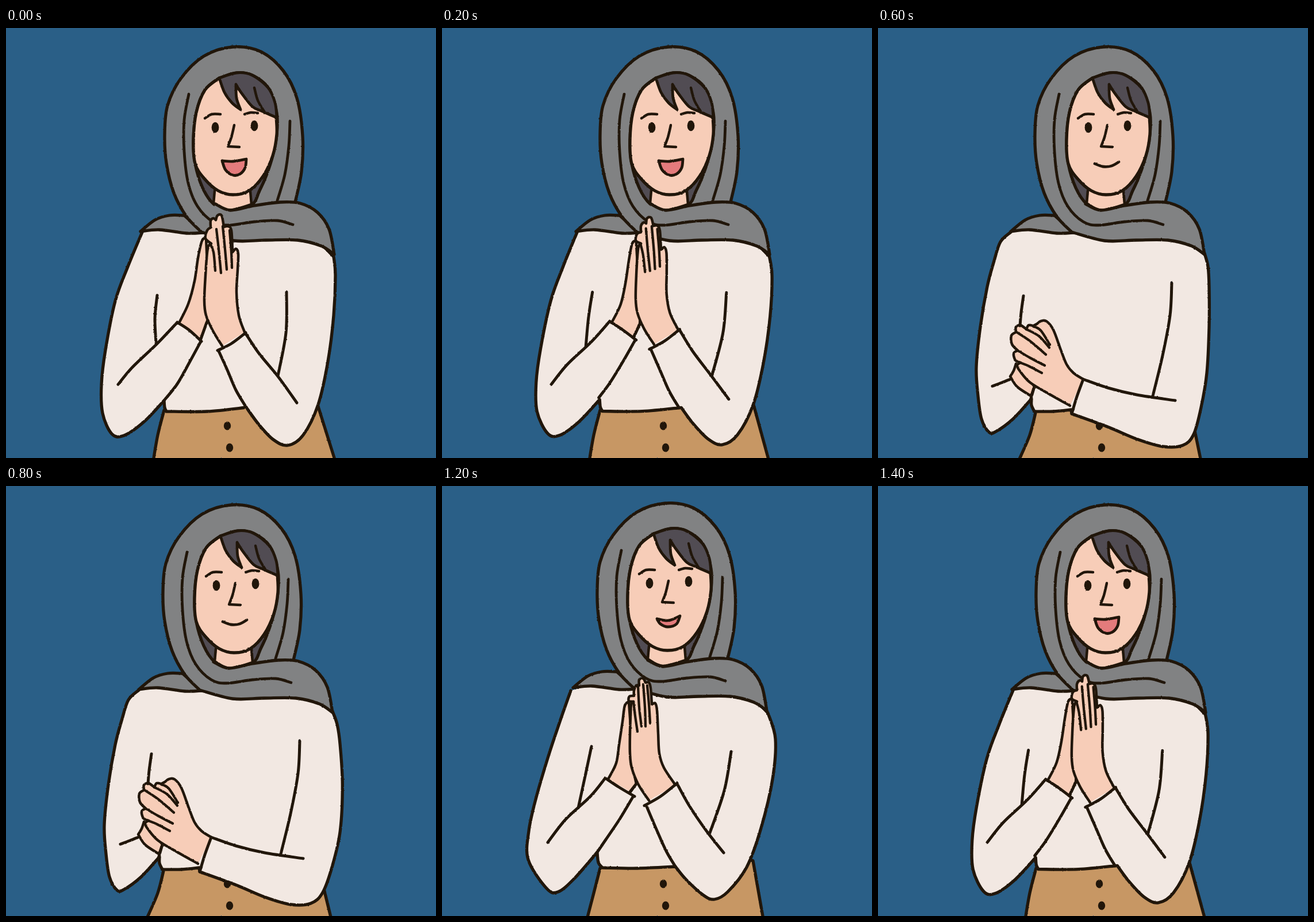
Animation, 748 px wide and 748 px high, one loop 1.6 s. Source, as an HTML page:

```html
<!DOCTYPE html>
<html lang="en">
<head>
<meta charset="utf-8">
<title>Greeting</title>
<style>
html, body { margin: 0; width: 100%; height: 100%; overflow: hidden; background: #2a5f87; }
svg { display: block; width: 100%; height: 100%; }
path { stroke: #21160a; stroke-linecap: round; stroke-linejoin: round; }
</style>
</head>
<body>
<svg id="stage" viewBox="0 0 748 748">
  <filter id="pencil" filterUnits="userSpaceOnUse" x="0" y="0" width="748" height="748" color-interpolation-filters="sRGB">
    <feTurbulence type="fractalNoise" baseFrequency=".25" numOctaves="2" seed="4"/>
    <feDisplacementMap in="SourceGraphic" scale="2" xChannelSelector="R" yChannelSelector="G"/>
  </filter>
</svg>
<script>
const SCARF = '#818283', SKIN = '#f7cdb8', SHIRT = '#f2e8e2', SKIRT = '#c79764',
  HAIR = '#514c53', LIP = '#e47b7c', INK = '#21160a', NONE = 'none';

// Smooth curves through key points: "/" marks a corner, ";" starts a new line.
const scarf = {
  drapeL: '232,354 257,334 282,326 308,326 / 342,356 / 312,357 265,351 232,354',
  hood: '338,355 312,328 290,287 277,235 274,185 279,135 302,88 342,49 392,33 441,41 480,74 504,122 514,188 512,250 501,303',
  drapeR: '362,306 388,317 430,309 475,303 510,305 540,321 560,350 569,394 / 546,379 505,369 450,369 395,370 338,355',
  folds: '316,115 308,160 308,215 315,270 331,310 358,337 385,343 430,337 470,335 497,342; 492,162 490,205 483,255 470,300'
};
const face = {
  opening: '372,87 347,108 332,147 327,195 330,236 343,278 362,306 388,317 428,308 442,283 454,256 465,222 472,185 472,148 458,105 429,82 402,78 372,87',
  neck: '364,283 / 362,305 / 388,317 428,307 / 426,284',
  skin: '372,87 347,108 332,147 327,195 330,236 346,262 370,283 396,290 424,283 448,258 465,222 472,185 471,154',
  fringe: '372,87 381,112 394,130 409,142 / 402,122 401,98 / 412,115 430,137 447,145 472,156 / 469,130 457,104 429,82 402,78 372,87',
  strand: '433,104 439,126 450,145',
  brows: '347,157 359,150 374,150; 416,150 427,147 439,148',
  nose: '398,169 393,190 387,206 / 407,207'
};
const mouths = {
  open: '377,231 / 396,232 419,228 / 417,243 408,254 396,256 383,247 377,231',
  half: '378,235 / 398,238 418,230 / 412,244 397,249 384,244 378,235',
  smile: '376,236 390,241 405,240 418,233'
};

// Two ends of the raised-hands gesture, point for point alike.
const upright = {
  body: '237,355 212,415 190,475 173,560 166,620 168,670 184,706 205,709 240,685 275,648 / 276,660 279,667 / 350,667 418,660 / 440,690 465,716 490,726 517,708 543,655 560,580 570,500 573,430 570,398',
  back: '301,513 / 317,480 328,440 334,400 341,370 348,365 / 354,500 / 349,512 / 338,544',
  front: '376,553 / 360,527 348,500 345,475 347,430 350,390 353,378 357,375 / 347,366 350,352 356,347 / 356,335 361,331 365,334 / 368,326 375,326 379,346 / 386,345 392,352 394,390 / 400,384 404,393 403,420 401,460 405,500 415,529',
  fingers: '355,375 361,390 364,422; 366,350 370,385 374,426; 377,345 381,385 384,420; 389,352 392,390 393,417',
  arms: '298,512 318,525 340,545; 339,545 320,580 298,619 275,648; 298,512 262,550 220,590 195,620; 263,465 259,505 261,548; 349,513 338,543; 368,561 392,549 417,530; 370,562 385,595 400,630 418,660; 416,530 440,566 473,606 506,652; 488,459 487,530 473,605'
};
const leaning = {
  body: '224,356 205,410 185,470 163,545 151,600 150,650 182,700 202,706 230,683 270,637 / 272,655 279,664 / 340,665 406,662 / 425,685 455,712 474,719 497,706 530,663 555,595 575,510 580,440 567,395',
  back: '289,510 / 303,482 308,450 314,410 318,382 325,375 / 334,500 / 338,518 / 328,532',
  front: '360,547 / 342,520 330,490 327,465 327,430 328,400 329,380 333,375 / 325,374 326,366 334,365 / 334,356 338,347 343,347 / 343,337 350,335 354,342 / 360,342 363,352 365,380 / 371,378 374,390 376,430 378,465 386,490 406,520',
  fingers: '333,375 336,400 340,427; 341,347 343,385 347,418; 350,345 353,385 354,418; 357,347 360,380 362,412',
  arms: '284,508 308,524 335,540; 332,541 310,578 285,615 270,637; 284,508 258,540 215,580 184,620; 260,453 250,500 237,560; 338,518 327,532; 352,556 380,540 409,517; 355,555 372,595 390,635 406,662; 409,518 430,556 460,600 490,638; 503,462 491,530 465,606'
};
const clasped = {
  body: '231,355 213,372 202,405 190,450 178,520 171,590 174,640 180,680 193,703 205,702 235,680 267,645 / 267,656 272,667 / 305,667 336,664 / 337,671 / 400,694 450,715 495,728 530,726 549,707 562,660 572,600 576,520 576,450 574,415 568,392',
  back: '240,584 236,596 230,606 / 242,624 266,640 / 272,624 / 258,600',
  front: '334,657 / 300,638 265,617 247,597 242,587 248,582 / 239,578 236,566 243,561 / 233,550 232,535 240,529 / 240,520 248,517 258,524 / 262,517 270,518 / 276,515 283,510 293,510 305,525 318,560 328,585 340,600 357,611',
  fingers: '258,524 280,536 298,556; 270,519 283,526 299,551; 241,529 265,545 292,568; 243,561 265,574 290,587; 247,582 262,588 285,600',
  arms: '337,671 346,641 357,611; 357,611 400,626 450,638 517,648; 511,443 508,500 495,570 478,640; 253,466 249,495 247,518; 199,623 215,617 230,611; 271,627 265,648'
};

function mix(from, to, t) {
  const ends = to.match(/\d+/g);
  let i = 0;
  return from.replace(/\d+/g, n => +n + (ends[i++] - n) * t);
}

// Hands lead the body on the way between the two raised poses.
const between = {};
for (const part in upright)
  between[part] = mix(upright[part], leaning[part], part === 'body' ? 0.15 : 0.45);

// The right elbow swings out.
const swung = {
  ...clasped,
  body: clasped.body.replace(/(5[3-9]\d),(\d+)/g, (_, x, y) =>
    `${+x + 10 * Math.sin(Math.PI * (y - 392) / 336)},${y}`)
};

// skirt: left and right edge at the bottom of the stage
const poses = {
  A: { limbs: upright, mouth: 'open', skirt: [256, 573], faceAt: [-1, 0], scarfAt: [2, 0] },
  B: { limbs: between, mouth: 'open', skirt: [256, 569], faceAt: [0, 0], scarfAt: [1, 0] },
  C: { limbs: leaning, mouth: 'half', skirt: [252, 559], faceAt: [-4, -4], scarfAt: [-4, -3] },
  D: { limbs: clasped, mouth: 'smile', skirt: [244, 562], faceAt: [1, 0], scarfAt: [-1, 0] },
  E: { limbs: swung, mouth: 'smile', skirt: [244, 566], faceAt: [1, 0], scarfAt: [-1, 0] }
};

const points = s => s.trim().split(/\s+/).map(p => p.split(',').map(Number));

function curve(text) {
  let d = '', last;
  for (const part of text.split('/')) {
    const p = points(part);
    if (last) p.unshift(last);
    else d = 'M' + p[0];
    for (let i = 0; i < p.length - 1; i++) {
      const a = p[i], b = p[i + 1], before = p[i - 1] || a, after = p[i + 2] || b;
      const c1 = a.map((v, k) => v + (b[k] - before[k]) / 6);
      const c2 = b.map((v, k) => v - (after[k] - a[k]) / 6);
      d += `C${c1} ${c2} ${b}`;
    }
    last = p[p.length - 1];
  }
  return d;
}

const shape = (text, fill, width = 5.3) =>
  `<path d="${text.split(';').map(curve).join('')}" fill="${fill}" stroke-width="${width}"/>`;
const dot = (x, y, rx, ry) => `<ellipse cx="${x}" cy="${y}" rx="${rx}" ry="${ry}" fill="${INK}"/>`;
const moved = (at, ...parts) => `<g transform="translate(${at})">${parts.join('')}</g>`;

function draw({ limbs, mouth, skirt: [left, right], faceAt, scarfAt }) {
  return [
    shape(`275,665 264,708 ${left},754 / ${right},754 / 541,652 / 500,640`, SKIRT),
    dot(385, 692, 6.2, 7.5), dot(389, 730, 6.2, 7.5),
    // the last two points lie hidden under the scarf
    shape(limbs.body + ' / 500,325 / 300,335', SHIRT),
    moved(scarfAt, shape(scarf.drapeL, SCARF), shape(scarf.hood, SCARF)),
    moved(faceAt,
      shape(face.opening, HAIR), shape(face.neck, SKIN, 4.5), shape(face.skin, SKIN),
      shape(face.fringe, HAIR, 4.8), shape(face.strand, NONE, 4.5),
      shape(face.brows, NONE, 4.5), shape(face.nose, NONE, 4.5),
      dot(365, 173, 6.4, 9.2), dot(433, 170, 6.4, 9.2),
      shape(mouths[mouth], mouth === 'smile' ? NONE : LIP, 4.8)),
    moved(scarfAt, shape(scarf.drapeR, SCARF), shape(scarf.folds, NONE, 4.8)),
    shape(limbs.back, SKIN, 4.5), shape(limbs.front, SKIN, 4.5),
    shape(limbs.fingers, NONE, 4.3), shape(limbs.arms, NONE, 5)
  ].join('');
}

const stage = document.getElementById('stage');
const figures = {};
for (const name in poses) {
  const g = document.createElementNS('http://www.w3.org/2000/svg', 'g');
  g.setAttribute('filter', 'url(#pencil)');
  g.innerHTML = draw(poses[name]);
  figures[name] = stage.appendChild(g);
}

const ORDER = 'ABCDEDCB', STEP = 200;

function update(time) {
  const now = ORDER[Math.floor(time / STEP) % ORDER.length];
  for (const name in figures) figures[name].style.display = name === now ? '' : 'none';
}

const start = performance.now();

function tick() {
  update(performance.now() - start);
  requestAnimationFrame(tick);
}

tick();
</script>
</body>
</html>
```
